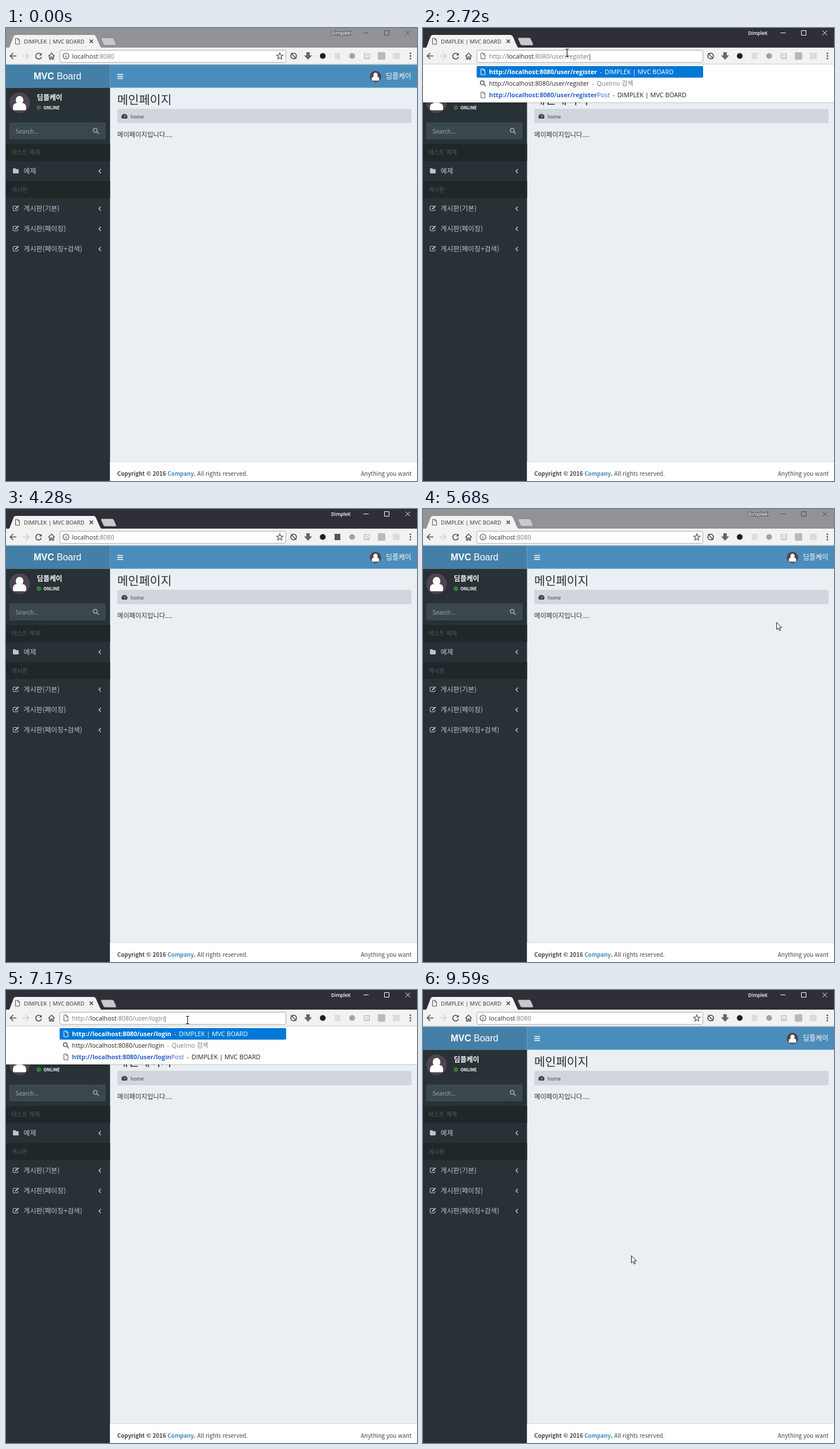
An HTML page for the animation above (9.81 s loop, 713x785 px).

```html
<!DOCTYPE html>
<html lang="ko">
<head>
<meta charset="utf-8">
<title>MVC Board</title>
<style>
html, body { margin: 0; width: 100%; height: 100%; overflow: hidden; background: #fff; }
svg { display: block; }
#stage { width: 100vw; height: 100vh; }
text { white-space: pre; }
.page { font-family: "Noto Sans CJK KR", "Noto Sans CJK", "Noto Sans CJK JP", sans-serif; font-size: 10px; }
.ui { font-family: "Open Sans", "Noto Sans", "Noto Sans CJK KR", sans-serif; font-size: 10.85px; }
.logo { font-family: "Liberation Sans", Arial, sans-serif; font-size: 16px; }
.title { font-family: "Noto Sans CJK KR Light", "Noto Sans CJK KR", "Noto Sans CJK JP", sans-serif; font-size: 20.5px; font-weight: 300; }
.owner { font-size: 8.3px; font-weight: 600; }
.tab { font-size: 9.5px; }
.name { font-size: 12px; }
.b { font-weight: 700; }
.line { fill: none; stroke: currentColor; }
.dim { fill: #7b7b7b; }
.link { fill: #2a62c9; }
.item { font-size: 11.85px; fill: #b8c7ce; }
.head { font-size: 10.1px; fill: #4b5d66; }

/* timed layers */
.t { animation: 9.81s step-end infinite; }
#blur { animation-name: blur; }
#dot { animation-name: dot; }
#sel { animation-name: sel; }
#list { animation-name: list; }
#reg { animation-name: reg; }
#log { animation-name: log; }
#goReg { animation-name: goReg; }
#goLog { animation-name: goLog; }
#busy { animation-name: busy; }
#shield { animation-name: shield; }
#cur { animation-name: move, seen; }
#arrow { animation-name: arrow; }
#beam { animation-name: beam; }

@keyframes blur {
  0%, 50.05% { opacity: 1 }
  13.35%, 66.56%, 100% { opacity: 0 }
}
@keyframes dot {
  0% { fill: #465c4a }
  30.78%, 100% { fill: #3b763c }
}
@keyframes sel {
  0%, 18.24%, 27.72%, 71.55%, 100% { opacity: 0 }
  13.35%, 19.77%, 66.56% { opacity: 1 }
}
@keyframes list {
  0%, 27.72%, 71.55%, 100% { opacity: 0 }
  22.12%, 69.92% { opacity: 1 }
}
@keyframes reg {
  0%, 30.78%, 100% { opacity: 0 }
  27.72% { opacity: 1 }
}
@keyframes log {
  0%, 76.35%, 100% { opacity: 0 }
  71.55% { opacity: 1 }
}
@keyframes goReg {
  0%, 31.8%, 100% { opacity: 0 }
  30.78% { opacity: 1 }
}
@keyframes goLog {
  0%, 77.06%, 100% { opacity: 0 }
  76.35% { opacity: 1 }
}
@keyframes busy {
  0%, 32.51%, 77.77%, 100% { opacity: 0 }
  30.78%, 76.35% { opacity: 1 }
}
@keyframes shield {
  0%, 53.21%, 97.75%, 100% { fill: #dedede }
  33.23%, 78.49% { fill: #55565a }
}
@keyframes seen {
  0%, 43.62% { opacity: 0 }
  .71%, 57.9%, 100% { opacity: 1 }
}
@keyframes arrow {
  0%, 42.2%, 90.51%, 100% { opacity: 1 }
  8.66%, 63.5% { opacity: 0 }
}
@keyframes beam {
  0%, 42.2%, 90.51%, 100% { opacity: 0 }
  8.66%, 63.5% { opacity: 1 }
}
@keyframes move {
  0% { transform: translate(611px, 725px) }
  .71% { transform: translate(611px, 725px); animation-timing-function: steps(5) }
  4.68% { transform: translate(400px, 260px); animation-timing-function: steps(5) }
  8.66% { transform: translate(262px, 43px) }
  13.35% { transform: translate(262px, 43px); animation-timing-function: steps(4) }
  16.61% { transform: translate(250px, 43px) }
  42.2% { transform: translate(480px, 110px) }
  42.91% { transform: translate(692px, 177px) }
  57.9% { transform: translate(613px, 196px); animation-timing-function: steps(4) }
  60.7% { transform: translate(400px, 90px); animation-timing-function: steps(3) }
  63.5% { transform: translate(315px, 52px) }
  90.51% { transform: translate(330px, 200px) }
  91.32% { transform: translate(369px, 510px) }
  92.14% { transform: translate(364px, 480px) }
  92.96%, 100% { transform: translate(361px, 460px) }
}
</style>
</head>
<body>
<svg id="stage" viewBox="0 0 713 785">
<defs>
  <g id="doc" class="line"><path d="M-3.5-5H1L3.5-2.5V5H-3.5ZM.8-5V-2.2H3.5"/></g>
  <g id="lens" class="line" stroke-width="1.5"><circle cx="-1.2" cy="-1.2" r="3.3"/><path d="M1.4 1.4L5 5"/></g>
  <g id="chev" class="line" stroke-width="1.4"><path d="M1.5-3.5L-1.8 0L1.5 3.5"/></g>
  <g id="edit" class="line" stroke-width="1.1"><path d="M2-4H-3.2Q-4.6-4-4.6-2.6V2.6Q-4.6 4-3.2 4H2.2Q3.6 4 3.6 2.6V.8"/><path d="M-1.2 1.2L4.8-4.2" stroke-width="2"/></g>
  <clipPath id="round"><circle r="18"/></clipPath>
  <g id="face" clip-path="url(#round)">
    <circle r="18" fill="#51434f"/>
    <path fill="#fff" d="M-11.5 10.5V8Q-11.5 1-5 .5Q0 4 5 .5Q11.5 1 11.5 8V10.5Q11.5 13 9 13H-9Q-11.5 13-11.5 10.5Z"/>
    <ellipse cy="-4.5" rx="6.6" ry="7.3" fill="#fff"/>
  </g>
  <g id="winBtns" class="line">
    <path d="M620 8.5H629M656.5 4.5H664.5V12.5H656.5ZM693 4.5L701 12.5M701 4.5L693 12.5"/>
  </g>
  <g id="sheet">
    <rect y="63" width="713" height="66" fill="#fff"/>
    <path d="M0 129.5H713" stroke="#000" stroke-opacity=".2"/>
    <rect x="93" y="66" width="393" height="20" rx="2" fill="#0078d7"/>
    <use href="#doc" x="104" y="76" color="#fff"/>
    <use href="#lens" x="104" y="96" color="#555"/>
    <use href="#doc" x="104" y="116" color="#555"/>
  </g>
  <g id="typing">
    <rect x="95" y="40" width="389" height="18" fill="#fff"/>
    <use href="#doc" x="104" y="48.5" color="#555"/>
    <use href="#sheet"/>
  </g>
</defs>

<!-- window frame -->
<rect width="713" height="35" fill="#2e2f37"/>
<g color="#fff"><use href="#winBtns"/></g>
<text class="ui owner" x="564" y="12" fill="#fff">DimpleK</text>
<g id="blur" class="t">
  <rect width="713" height="35" fill="#929397"/>
  <g color="#505156"><use href="#winBtns"/></g>
  <text class="ui owner" x="564" y="12" fill="#fff" stroke="#55565b" stroke-width="2" paint-order="stroke">DimpleK</text>
</g>
<path d="M166 17H184Q186 17 187 19L191 28Q191.5 30 189.5 30H172Q170 30 169 28L165 19Q164.5 17 166 17Z" fill="#c9c9cb" stroke="#6c6d72" stroke-width=".6"/>
<path d="M4 35Q6 34 7 31L13 15Q14.5 12 17 12H152Q154.5 12 156 15L163 31Q164.5 34 167 35Z" fill="#f2f2f2"/>
<use href="#doc" x="20" y="23" color="#555"/>
<text class="ui tab" x="31" y="26.5" fill="#333">DIMPLEK | MVC BOARD</text>
<path d="M145 20L151 26M151 20L145 26" stroke="#444" stroke-width="1.5"/>

<!-- toolbar -->
<rect y="34" width="713" height="29" fill="#f2f2f2"/>
<path d="M0 62.5H713" stroke="#cfcfcf"/>
<g class="line" color="#505050" stroke-width="1.6">
  <path d="M18 48.5H7.5M12.5 43.3L7.3 48.5L12.5 53.7"/>
  <path d="M29 48.5H39.5M34.5 43.3L39.7 48.5L34.5 53.7" stroke="#cfcfcf"/>
  <path d="M60.3 45.3A5 5 0 1 0 61.5 50"/>
  <path d="M62 43V47.5H57.5Z" fill="#505050" stroke="none"/>
  <path d="M73.5 49L79 43.5L84.5 49M75.5 48V54H77.7V50.5H80.3V54H82.5V48" stroke-width="1.4"/>
</g>
<rect x="93.5" y="38.5" width="392" height="21" rx="2" fill="#fff" stroke="#adadad"/>
<circle cx="104" cy="48.5" r="5" fill="none" stroke="#555" stroke-width="1.2"/>
<path d="M104 47.7V51.5M104 45.3V46.6" stroke="#555" stroke-width="1.3"/>
<path d="M475 43L476.5 46.9L480.5 47.1L477.4 49.7L478.4 53.7L475 51.5L471.6 53.7L472.6 49.7L469.5 47.1L473.5 46.9Z" fill="none" stroke="#555" stroke-width="1.2"/>
<text class="ui" x="114.5" y="52.5" fill="#333">localhost<tspan class="dim">:8080</tspan></text>

<!-- extension buttons -->
<g class="line" color="#505154" stroke-width="1.8"><circle cx="499" cy="48.5" r="4.8"/><path d="M494.5 43.5L503.5 53.5" stroke-width="1.5"/></g>
<path d="M521 42H527V47.5H531L524 55L517 47.5H521Z" fill="#66676b"/>
<circle cx="549.5" cy="48.5" r="5" fill="#1f1f20"/>
<rect id="shield" class="t" x="570" y="43" width="10" height="11"/>
<circle cx="600.5" cy="48.5" r="5" fill="#a2a2a2"/>
<g class="line" color="#b2b2b2"><path d="M621.5 44.5H630.5V51.5H621.5ZM621 53.5H631M624 48H628" stroke-width="1.2"/></g>
<rect x="645" y="42" width="13" height="13" rx="2" fill="#bababa"/>
<rect x="671" y="43" width="12" height="11" fill="#dcdcdc"/>
<g fill="#555"><circle cx="701.5" cy="44" r="1.4"/><circle cx="701.5" cy="48.5" r="1.4"/><circle cx="701.5" cy="53" r="1.4"/></g>

<!-- page -->
<g class="page">
  <rect y="63" width="713" height="722" fill="#eaeff4"/>
  <rect x="180.5" y="63.5" width="532.5" height="40" fill="#4b8dba"/>
  <rect y="63.5" width="180.5" height="40" fill="#447fa7"/>
  <rect y="103.5" width="180.5" height="681.5" fill="#283135"/>
  <text class="logo" x="48" y="89" fill="#fff"><tspan class="b">MVC</tspan> Board</text>
  <path d="M193 80.5H203M193 84H203M193 87.5H203" stroke="#fff" stroke-width="1.6"/>
  <use href="#face" transform="translate(641 84) scale(.556)"/>
  <text class="name" x="659" y="87.5" fill="#fff">딤플케이</text>

  <use href="#face" x="23.5" y="129.5"/>
  <text class="name b" x="53.5" y="125" fill="#fff">딤플케이</text>
  <circle id="dot" class="t" cx="57" cy="138" r="4"/>
  <text class="b" x="65" y="141" style="font-size:7.5px" fill="#fff">ONLINE</text>
  <rect x="5.5" y="163.5" width="167.5" height="29.5" rx="2" fill="#3a484e"/>
  <text x="16.5" y="183" fill="#9ba5a9">Search...</text>
  <use href="#lens" x="156" y="178.5" color="#a3acb0"/>

  <rect y="201" width="180.5" height="29.5" fill="#1f2729"/>
  <rect y="265" width="180.5" height="29.5" fill="#1f2729"/>
  <text class="head" x="9.5" y="219">테스트 예제</text>
  <text class="head" x="9.5" y="283.5">게시판</text>
  <path d="M12 244.5Q12 243 13.5 243H15.5Q17 243 17 244.5H20.5Q22 244.5 22 246V250.5Q22 252 20.5 252H13.5Q12 252 12 250.5Z" fill="#b8c7ce"/>
  <text class="item" x="30.5" y="251.5">예제</text>
  <text class="item" x="30.5" y="316.5">게시판(기본)</text>
  <text class="item" x="30.5" y="351.5">게시판(페이징)</text>
  <text class="item" x="30.5" y="386.5">게시판(페이징+검색)</text>
  <g color="#b8c7ce">
    <use href="#edit" x="17" y="312.5"/><use href="#edit" x="17" y="347.5"/><use href="#edit" x="17" y="382.5"/>
    <use href="#chev" x="163" y="248"/><use href="#chev" x="163" y="313"/><use href="#chev" x="163" y="348"/><use href="#chev" x="163" y="383"/>
  </g>

  <text class="title" x="193" y="131.5" fill="#2c2e30">메인페이지</text>
  <rect x="193" y="140" width="510.5" height="25" rx="2" fill="#d1d5de"/>
  <path d="M201.5 157A5 5 0 1 1 209.5 157Z" fill="#3a3a3a"/>
  <path d="M205.5 155.5L207 151M203 153.5H203.8M204 150.8H204.8M207.8 153.5H208.6" stroke="#d1d5de"/>
  <text x="216" y="156.5" style="font-size:8.6px" fill="#444">home</text>
  <text x="193" y="188.5" style="font-size:11.3px" fill="#333">메이페이지입니다....</text>

  <rect x="180.5" y="752" width="532.5" height="33" fill="#fff"/>
  <path d="M180.5 751.5H713" stroke="#d2d6de"/>
  <text x="193" y="776" fill="#444"><tspan class="b" style="font-size:9.75px">Copyright © 2016 <tspan fill="#3c8dbc">Company</tspan>.</tspan> All rights reserved.</text>
  <text x="703.5" y="776" text-anchor="end" fill="#444">Anything you want</text>
</g>

<!-- address bar states -->
<g class="ui" fill="#222">
  <g id="sel" class="t">
    <rect x="114" y="40" width="73.5" height="17" fill="#2b78d2"/>
    <text x="114.5" y="52.5" fill="#fff">localhost:8080</text>
  </g>
  <g id="goReg" class="t">
    <rect x="113" y="40" width="340" height="18" fill="#fff"/>
    <text x="114.5" y="52.5">localhost<tspan class="dim">:8080/user/register</tspan></text>
  </g>
  <g id="goLog" class="t">
    <rect x="113" y="40" width="340" height="18" fill="#fff"/>
    <text x="114.5" y="52.5">localhost<tspan class="dim">:8080/user/login</tspan></text>
  </g>
  <g id="busy" class="t">
    <rect x="14" y="16" width="12" height="14" fill="#f2f2f2"/>
    <rect x="49" y="41" width="15" height="15" fill="#f2f2f2"/>
    <path d="M52 44L61 53M61 44L52 53" stroke="#505050" stroke-width="1.6"/>
  </g>
  <g id="list" class="t">
    <rect y="63" width="713" height="126" fill="#fff"/>
    <use href="#sheet"/>
    <rect y="128" width="713" height="61" fill="#fff"/>
    <path d="M0 189.5H713" stroke="#000" stroke-opacity=".2"/>
    <g color="#555"><use href="#doc" x="104" y="136"/><use href="#doc" x="104" y="156"/><use href="#doc" x="104" y="176"/></g>
    <text x="114.5" y="80" fill="#fff"><tspan class="b">localhost:8080</tspan><tspan dx="2"> - </tspan><tspan dx="2">DIMPLEK | MVC BOARD</tspan></text>
    <text x="114.5" y="100">localhost:8080<tspan class="dim"><tspan dx="2"> - </tspan><tspan dx="2">Quelmo 검색</tspan></tspan></text>
    <text x="114.5" y="120"><tspan class="link"><tspan class="b">localhost:8080</tspan>/user/login</tspan><tspan dx="2"> - </tspan><tspan dx="2">DIMPLEK | MVC BOARD</tspan></text>
    <text x="114.5" y="140"><tspan class="link"><tspan class="b">localhost:8080</tspan>/user/register</tspan><tspan dx="2"> - </tspan><tspan dx="2">DIMPLEK | MVC BOARD</tspan></text>
    <text x="114.5" y="160"><tspan class="link"><tspan class="b">localhost:8080</tspan>/user/loginPost</tspan><tspan dx="2"> - </tspan><tspan dx="2">DIMPLEK | MVC BOARD</tspan></text>
    <text x="114.5" y="180"><tspan class="link"><tspan class="b">localhost:8080</tspan>/user/logout</tspan><tspan dx="2"> - </tspan><tspan dx="2">DIMPLEK | MVC BOARD</tspan></text>
  </g>
  <g id="reg" class="t">
    <use href="#typing"/>
    <text x="114.5" y="52.5"><tspan class="dim">http://</tspan>localhost<tspan class="dim">:8080/user/register</tspan><tspan dx="-1.5">|</tspan></text>
    <text x="114.5" y="80" fill="#fff"><tspan class="b">http://localhost:8080/user/register</tspan><tspan dx="2"> - </tspan><tspan dx="2">DIMPLEK | MVC BOARD</tspan></text>
    <text x="114.5" y="100">http://localhost:8080/user/register<tspan class="dim"><tspan dx="2"> - </tspan><tspan dx="2">Quelmo 검색</tspan></tspan></text>
    <text x="114.5" y="120"><tspan class="link"><tspan class="b">http://localhost:8080/user/register</tspan>Post</tspan><tspan dx="2"> - </tspan><tspan dx="2">DIMPLEK | MVC BOARD</tspan></text>
  </g>
  <g id="log" class="t">
    <use href="#typing"/>
    <text x="114.5" y="52.5"><tspan class="dim">http://</tspan>localhost<tspan class="dim">:8080/user/login</tspan><tspan dx="-1.5">|</tspan></text>
    <text x="114.5" y="80" fill="#fff"><tspan class="b">http://localhost:8080/user/login</tspan><tspan dx="2"> - </tspan><tspan dx="2">DIMPLEK | MVC BOARD</tspan></text>
    <text x="114.5" y="100">http://localhost:8080/user/login<tspan class="dim"><tspan dx="2"> - </tspan><tspan dx="2">Quelmo 검색</tspan></tspan></text>
    <text x="114.5" y="120"><tspan class="link"><tspan class="b">http://localhost:8080/user/login</tspan>Post</tspan><tspan dx="2"> - </tspan><tspan dx="2">DIMPLEK | MVC BOARD</tspan></text>
  </g>
</g>

<!-- pointer -->
<g id="cur" class="t">
  <path id="arrow" class="t" d="M.5 .5V13L3.3 10.3L5.3 15L7.3 14.1L5.3 9.5H9.2Z" fill="#fff" stroke="#222"/>
  <g id="beam" class="t" fill="none">
    <path d="M-3-6.5H-.8L0-5.8L.8-6.5H3M0-5.8V5.8M-3 6.5H-.8L0 5.8L.8 6.5H3" stroke="#222" stroke-width="1.2"/>
  </g>
</g>
</svg>
</body>
</html>
```
